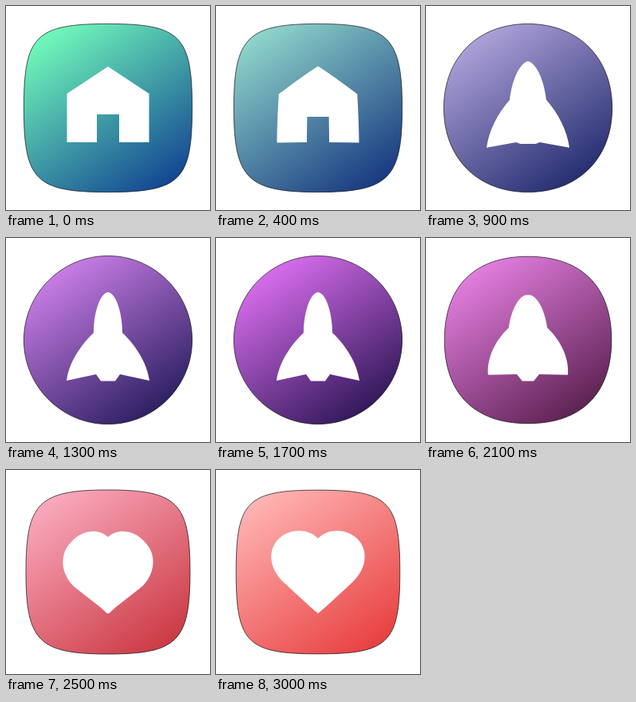
An HTML page for the animation above (3100 ms loop, 256 by 256 pixels).

```html
<!DOCTYPE html>
<html lang="en">
<head>
<meta charset="utf-8">
<title>Icon morph</title>
<style>
html, body { margin: 0; width: 100%; height: 100%; overflow: hidden; background: #fff; }
svg { display: block; width: 100vw; height: 100vh; }
</style>
</head>
<body>
<svg viewBox="0 0 256 256">
  <defs>
    <linearGradient id="fill" gradientUnits="userSpaceOnUse" x1="58" y1="32" x2="194" y2="228">
      <stop id="light" offset="0"/>
      <stop id="dark" offset="1"/>
    </linearGradient>
  </defs>
  <path id="tile" fill="url(#fill)" stroke="#0c0c0c" stroke-width=".7"/>
  <path id="icon" fill="#fff"/>
</svg>
<script>
const LOOP = 3100, STEP = 100, PHASE = 1500, MORPH = 1400, POWER = 3.6, MID = 128;
const el = id => document.getElementById(id);
const mix = (a, b, p) => Array.isArray(a) ? a.map((v, i) => mix(v, b[i], p)) : a + (b - a) * p;
const clamp = t => Math.min(1, Math.max(0, t));
const ease = (t, n) => t < 0.5 ? 0.5 * (2 * t) ** n : 1 - 0.5 * (2 - 2 * t) ** n;

// Handles that keep the edge from a to b straight.
const straight = (a, b) => [mix(a, b, 1 / 3), mix(a, b, 2 / 3)];

// Right half of an icon: two curves top-side-corner, then straight to inner and base.
// Points are [distance from the axis, y].
function half({ top, side, corner, inner, base, upper, lower }) {
  upper = upper || straight(top, side);
  lower = lower || straight(side, corner);
  return [top, ...upper, side, ...lower, corner, inner, base];
}

const house = {
  radius: 105.6, handle: 0.86, delay: 0,
  light: [112, 248, 186], dark: [20, 72, 146],
  half: half({ top: [0, 76], side: [51.5, 110], corner: [51.5, 171], inner: [14, 171], base: [14, 136] })
};
const rocket = {
  radius: 105.6, handle: 0.552, delay: 60,
  light: [224, 112, 245], dark: [38, 20, 82],
  half: half({
    top: [0, 68], side: [18, 119], corner: [52, 179], inner: [15, 171], base: [9, 179.5],
    upper: [[10, 69], [18, 94]], lower: [[35, 135], [49, 157]]
  })
};
const heart = {
  radius: 102.8, handle: 0.865,
  light: [255, 180, 180], dark: [232, 64, 64],
  half: half({
    top: [0, 86], side: [49, 86], corner: [42, 142], inner: [10, 171.5], base: [0, 180],
    upper: [[12, 73], [35, 73]], lower: [[62, 98], [64, 122]]
  })
};
const states = [house, rocket, heart];

function tilePath(r, k) {
  const h = r * k, lo = MID - r, hi = MID + r, a = MID - h, b = MID + h;
  return `M${MID} ${lo}C${b} ${lo} ${hi} ${a} ${hi} ${MID}S${b} ${hi} ${MID} ${hi}` +
    `S${lo} ${b} ${lo} ${MID}S${a} ${lo} ${MID} ${lo}Z`;
}

function iconPath(points) {
  const right = points.map(([x, y]) => `${MID + x} ${y}`);
  const left = points.map(([x, y]) => `${MID - x} ${y}`).reverse();
  return `M${right[0]}C${right.slice(1, 7).join(' ')}L${right.slice(7).join(' ')}` +
    `L${left.slice(0, 3).join(' ')}C${left.slice(3).join(' ')}Z`;
}

function draw(time) {
  const now = Math.floor((time % LOOP) / STEP) * STEP;
  const i = now < PHASE ? 0 : 1;
  const a = states[i], b = states[i + 1];
  const spent = now - i * PHASE;
  const tile = ease(clamp(spent / MORPH), POWER);
  const icon = ease(clamp((spent - a.delay) / MORPH), POWER);
  const tint = ease(spent / PHASE, i ? 3 : 1);
  el('tile').setAttribute('d', tilePath(mix(a.radius, b.radius, tile), mix(a.handle, b.handle, tile)));
  el('icon').setAttribute('d', iconPath(mix(a.half, b.half, icon)));
  for (const id of ['light', 'dark'])
    el(id).setAttribute('stop-color', `rgb(${mix(a[id], b[id], tint).map(Math.round)})`);
}

const begin = performance.now();
function frame() {
  draw(performance.now() - begin);
  requestAnimationFrame(frame);
}
draw(0);
requestAnimationFrame(frame);
</script>
</body>
</html>
```
